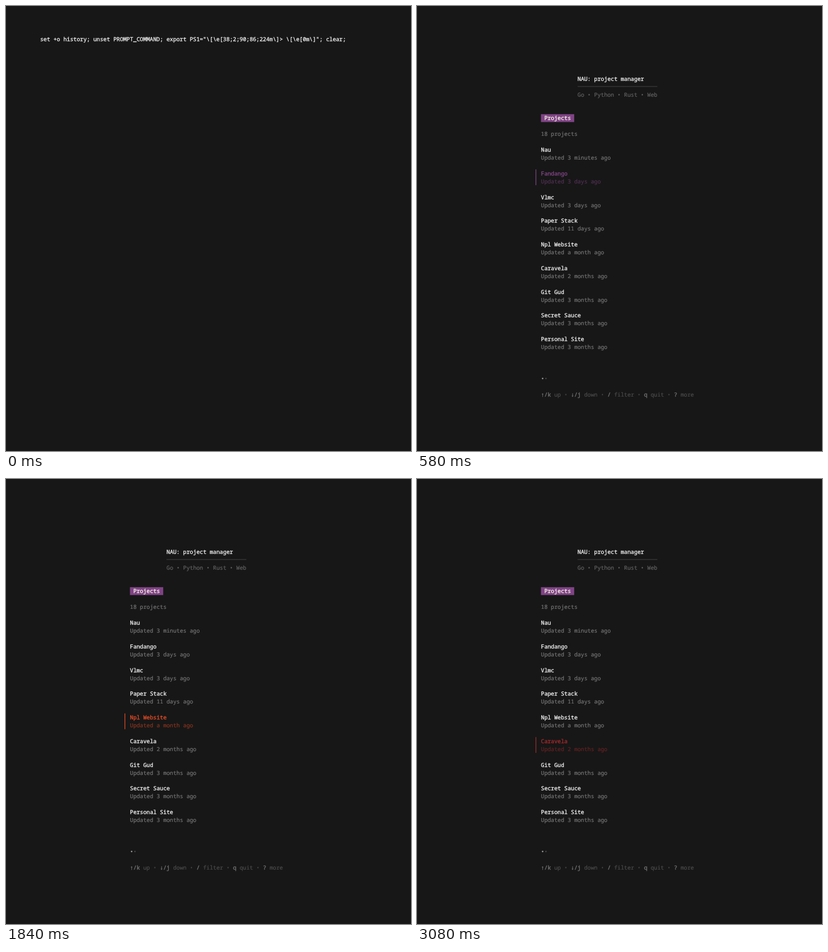
Recreate the animation shown at these times as an HTML page. Size 714 by 785 pixels, loop 3300 ms.

```html
<!DOCTYPE html>
<html lang="en">
<head>
<meta charset="utf-8">
<title>Project manager</title>
<style>
html, body { margin: 0; width: 100%; height: 100%; overflow: hidden; background: #171717; }
svg { display: block; }
text {
  font: 9.77px "Noto Sans Mono", "DejaVu Sans Mono", monospace;
  font-variant-ligatures: none;
  white-space: pre;
  text-rendering: geometricPrecision;
  stroke-width: 0.2;
}
.bright { stroke-width: 0.36; }
</style>
</head>
<body>
<svg id="stage" width="714" height="785" viewBox="0 0 714 785"></svg>
<script>
const LOOP = 3300, CELL_W = 5.862, CELL_H = 13.92, LEFT = 54.4, TOP = 51.6;
const WHITE = "#ececec", GREY = "#747474";
const SETUP = String.raw`set +o history; unset PROMPT_COMMAND; export PS1="\[\e[38;2;90;86;224m\]> \[\e[0m\]"; clear;`;
const COMMAND = "./bin/nau";

// title, age, highlight colour
const PROJECTS = [
  ["Nau", "3 minutes", "#00add8"],
  ["Fandango", "3 days", "#804485"],
  ["Vlmc", "3 days", "#dea584"],
  ["Paper Stack", "11 days", "#e6d44e"],
  ["Npl Website", "a month", "#e34c26"],
  ["Caravela", "2 months", "#a52a2c"],
  ["Git Gud", "3 months", "#00add8"],
  ["Secret Sauce", "3 months"],
  ["Personal Site", "3 months"]
];

// start time, selected row
const SELECTIONS = [[420, 0], [580, 1], [1040, 2], [1380, 3], [1840, 4], [2200, 5], [2800, 6], [3080, 5]];

const colX = col => LEFT + col * CELL_W;
const rowY = row => TOP + row * CELL_H;
const escape = s => s.replace(/&/g, "&amp;").replace(/</g, "&lt;").replace(/>/g, "&gt;");

function text(col, row, string, fill = WHITE, bright = fill === WHITE, opacity = 1) {
  return `<text class="${bright ? "bright" : ""}" x="${colX(col)}" y="${rowY(row) + 10.6}" `
    + `fill="${fill}" stroke="${fill}" opacity="${opacity}">${escape(string)}</text>`;
}

const rect = (x, y, w, h, fill) =>
  `<rect x="${x}" y="${y}" width="${w}" height="${h}" fill="${fill}"/>`;

const cells = (col, row, count, fill) =>
  rect(colX(col), rowY(row), count * CELL_W, CELL_H, fill);

const cursor = (col, row) => cells(col, row, 1, "#d9d9d9");

const dot = (col, row, fill) =>
  `<circle cx="${colX(col + 0.5)}" cy="${rowY(row + 0.5)}" r="1.3" fill="${fill}"/>`;

function prompt(typed) {
  return text(0, 0, ">", "#5a56e0", true) + text(2, 0, COMMAND.slice(0, typed));
}

function help() {
  const keys = [["↑/k", "up"], ["↓/j", "down"], ["/", "filter"], ["q", "quit"], ["?", "more"]];
  let col = 28, out = "";
  keys.forEach(([key, label], i) => {
    out += text(col, 45, key, "#737373", true);
    col += key.length + 1;
    out += text(col, 45, label, "#4c4c4c");
    col += label.length + 1;
    if (i < keys.length - 1) out += text(col, 45, "•", "#404040");
    col += 2;
  });
  return out;
}

function project([title, age, color], i, selected) {
  const row = 14 + 3 * i, on = i === selected;
  return text(28, row, title, on ? color : WHITE, true)
    + text(28, row + 1, `Updated ${age} ago`, on ? color : GREY, false, on ? 0.54 : 1)
    + (on ? rect(209, rowY(row), 1.2, 2 * CELL_H, color) : "");
}

function list(selected) {
  return text(39, 5, "NAU: project manager")
    + rect(colX(39), 141.5, 24 * CELL_W, 1, "#424242")
    + text(39, 7, "Go • Python • Rust • Web", "#626262")
    + cells(28, 10, 10, "#7f4385")
    + text(29, 10, "Projects", "#f6f3e4", true)
    + text(28, 12, "18 projects", GREY)
    + PROJECTS.map((p, i) => project(p, i, selected)).join("")
    + dot(28, 43, "#a0a0a0") + dot(29, 43, "#444")
    + help();
}

function scene(t) {
  if (t < 20) return text(1, 0, SETUP);
  if (t < 380) {
    const typed = Math.min(COMMAND.length, Math.floor(t / 20) - 1);
    return prompt(typed) + cursor(2 + typed, 0);
  }
  if (t < 400) return prompt(COMMAND.length) + cursor(0, 1);
  if (t < 420) return "";
  return list(SELECTIONS.filter(([start]) => start <= t).pop()[1]);
}

const stage = document.getElementById("stage");
const start = performance.now();
let shown = null;

function draw(now) {
  const next = scene(Math.max(0, now - start) % LOOP);
  if (next !== shown) {
    shown = next;
    stage.innerHTML = next;
  }
  requestAnimationFrame(draw);
}
draw(start);
</script>
</body>
</html>
```
